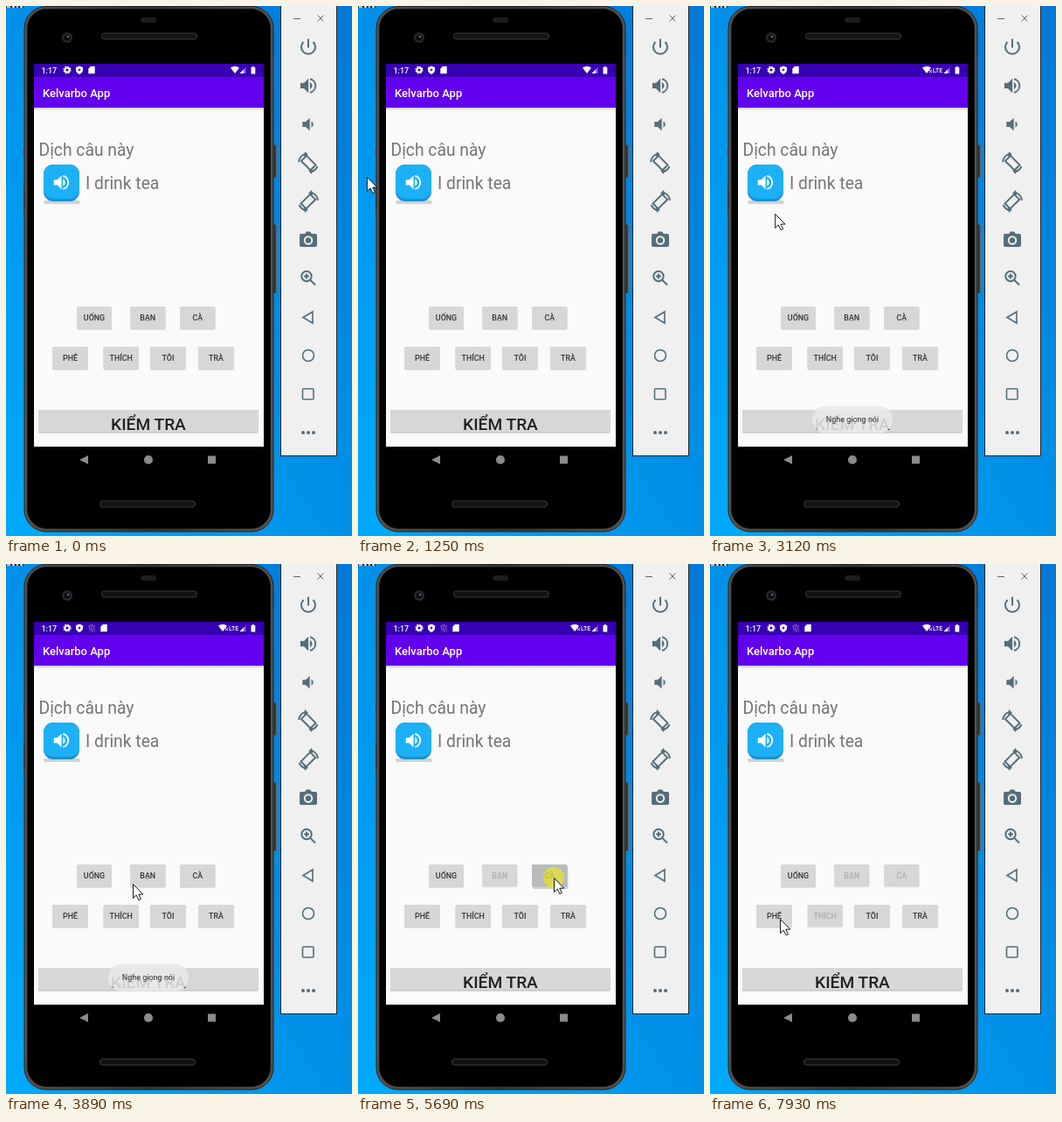
These frames come from a looping animation (396 px wide and 605 px high, 7990 ms). An HTML page:

```html
<!DOCTYPE html>
<html lang="vi">
<head>
<meta charset="utf-8">
<title>Emulator</title>
<style>
  html, body { margin: 0; width: 100%; height: 100%; overflow: hidden; background: #0090e6; }
  svg { display: block; width: 100vw; height: 100vh; }
  text { font-family: Roboto, "Noto Sans", sans-serif; }
  .word { font-size: 8.9px; font-weight: 500; text-anchor: middle; fill: #333; }
  .prompt { font-size: 19.3px; fill: #757575; }
  .line { fill: none; stroke: #546e7a; stroke-width: 2; }
  .solid { fill: #546e7a; }
</style>
</head>
<body>
<svg viewBox="0 0 396 605" xmlns="http://www.w3.org/2000/svg">
  <defs>
    <linearGradient id="sky" x1="0" y1="1" x2="1" y2="0">
      <stop offset="0" stop-color="#00aafa"/><stop offset="1" stop-color="#0078d7"/>
    </linearGradient>
    <linearGradient id="edge">
      <stop offset="0" stop-color="#55504e"/><stop offset=".5" stop-color="#353332"/><stop offset="1" stop-color="#55504e"/>
    </linearGradient>
    <linearGradient id="barShadow" x1="0" y1="0" x2="0" y2="1">
      <stop offset="0" stop-color="#000" stop-opacity=".22"/><stop offset="1" stop-color="#000" stop-opacity="0"/>
    </linearGradient>
    <path id="speaker" d="M3 9v6h4l5 5V4L7 9zM14 8a4.5 4.5 0 0 1 0 8z"/>
    <path id="wave" d="M14 4.2a8 8 0 0 1 0 15.6" fill="none" stroke-width="2"/>
    <g id="turn">
      <path class="line" d="M7.5 5.5 13.5 -.5 24 10 18 16z" transform="translate(-3.6 4.4)"/>
      <path class="line" d="M1 11A11 11 0 0 1 10 1.5M14 22.5A11 11 0 0 0 22.5 16" stroke-width="1.6"/>
      <path class="solid" d="M8-1l4 4-5 2zM16 25l-4-4 5-2z"/>
    </g>
  </defs>

  <rect width="396" height="605" fill="url(#sky)"/>
  <path d="M0 0h20v2H0z" fill="#10263a"/>
  <path d="M1 1h4M7 1h3M12 1h2M16 1h3" stroke="#fff" stroke-width="1.6"/>

  <!-- Phone body -->
  <g fill="#35383c" stroke="#777" stroke-width=".7">
    <rect x="304" y="158" width="5.5" height="38" rx="1.5"/>
    <rect x="304" y="249" width="5.5" height="79" rx="1.5"/>
    <path d="M22 163h-2v7h2M22 205h-2v32h2"/>
  </g>
  <rect x="21" y=".5" width="285" height="599.5" rx="25" fill="url(#edge)" stroke="#252424"/>
  <rect x="24.5" y="3.5" width="278" height="593" rx="22" stroke="#171717"/>
  <rect x="154" y="13" width="18" height="6" rx="3" fill="#1d1d20"/>
  <circle cx="70" cy="36" r="6" fill="#26282b"/>
  <circle cx="70" cy="36" r="3.5" fill="#08090c"/>
  <circle cx="71" cy="35" r="1.5" fill="#565d66"/>
  <g fill="#131313" stroke="#3a3a3a">
    <rect x="109.500" y="31" width="109" height="7" rx="3.500"/>
    <rect x="107.500" y="565" width="109" height="7" rx="3.500"/>
  </g>

  <!-- App -->
  <rect x="32" y="66" width="263" height="437" fill="#fafafa"/>
  <rect x="32" y="66" width="263" height="15" fill="#3700b3"/>
  <rect x="32" y="81" width="263" height="35" fill="#6200ee"/>
  <rect x="32" y="116" width="263" height="3" fill="url(#barShadow)"/>
  <g fill="#fff">
    <text x="40.500" y="76.500" font-size="9" font-weight="500">1:17</text>
    <circle cx="70" cy="73" r="2.600" fill="none" stroke="#fff" stroke-width="2"/>
    <circle cx="70" cy="73" r="4" fill="none" stroke="#fff" stroke-width="1.200" stroke-dasharray="1.600 1.540"/>
    <path d="M84 68.500l4 1.500v3q0 3-4 5-4-2-4-5v-3z"/>
    <circle cx="84" cy="73" r="1.300" fill="#3700b3"/>
    <g id="print" fill="none" stroke="#8e6cd0" stroke-width=".9">
      <path d="M94 72q4-5 8 0M95 75q0-4 3-4t3.500 6M97 77q-.500-4 1-4t1 5"/>
    </g>
    <path id="card" d="M97 69h4.500v8h-7v-5.500zM97 70.500v1.500M99 70.500v1.500" stroke="#fff" stroke-width=".4"/>
    <path id="wifi" d="M257 70.500q5-3.500 10 0l-5 6.500z"/>
    <g id="lte">
      <path d="M251 73l3 3m0-3l-3 3" stroke="#fff"/>
      <text x="255" y="76" font-size="7" font-weight="500">LTE</text>
    </g>
    <path d="M267.500 77l7-7v7z" opacity=".4"/>
    <path d="M267.500 77l4.500-4.500V77z"/>
    <path d="M280.500 70h1.300v-1h2.200v1h1.300v7.500h-4.800z"/>
    <text x="42" y="104" font-size="13" font-weight="500">Kelvarbo App</text>
  </g>
  <text class="prompt" x="37.500" y="171">Dịch câu này</text>
  <text class="prompt" x="91" y="209">I drink tea</text>

  <rect id="soundBase" x="43.500" y="222" width="41" height="4" fill="#d0d1d1"/>
  <rect x="43" y="181" width="41" height="42" rx="11" fill="#1792d0"/>
  <rect x="43" y="181" width="41" height="39" rx="11" fill="#1cb0f6"/>
  <g transform="translate(52 190)" fill="#fff" stroke="#fff" stroke-width=".2">
    <use href="#speaker" transform="scale(.95)"/><use href="#wave" transform="scale(.95)"/>
  </g>

  <g id="words"></g>

  <rect x="37" y="461" width="251.500" height="26.500" rx="1" fill="#b9baba"/>
  <rect x="37" y="461" width="251.500" height="25.500" rx="1" fill="#d6d7d7"/>
  <text x="163" y="484" font-size="19.200" font-weight="500" text-anchor="middle" fill="#222">KIỂM TRA</text>
  <g id="toast">
    <rect x="117" y="456.500" width="92" height="31" rx="15.500" fill="#ebebeb" opacity=".86"/>
    <text x="163" y="475" font-size="9" text-anchor="middle" fill="#333">Nghe giọng nói</text>
  </g>

  <rect x="32" y="503" width="263" height="30"/>
  <g fill="#8b8b8b">
    <path d="M84 518l10-5v10z"/><circle cx="163" cy="518" r="5"/><path d="M231 513.500h9v9h-9z"/>
  </g>

  <!-- Emulator toolbar -->
  <rect x="314.500" y="-1" width="64" height="514.500" fill="#f0f0f0" stroke="#222"/>
  <path d="M329 14.500h8M356.500 10.500l7 7m0-7l-7 7" stroke="#666" fill="none"/>
  <path class="line" d="M346 37.500v10M340.500 41a8 8 0 1 0 11 0"/>
  <g class="solid" transform="translate(334 79)" stroke="#546e7a" stroke-width=".2">
    <use href="#speaker"/><use href="#wave"/>
  </g>
  <use class="solid" href="#speaker" transform="translate(336.500 124) scale(.93)"/>
  <use href="#turn" transform="translate(334 167)"/>
  <use href="#turn" transform="translate(358 211) scale(-1 1)"/>
  <path class="solid" d="M338 260h4l2-2.500h4l2 2.500h4q2 0 2 2v11q0 2-2 2h-16q-2 0-2-2v-11q0-2 2-2z"/>
  <circle cx="346" cy="267.500" r="4.200" fill="#546e7a" stroke="#f0f0f0" stroke-width="2"/>
  <circle class="line" cx="344" cy="308.500" r="5.700"/>
  <path class="line" d="M348.500 313l5.500 5.500"/>
  <path class="line" d="M341 308.500h6m-3-3v6" stroke-width="1.200"/>
  <path class="line" d="M340 355.500l11-6.500v13z" style="stroke-width:1.600"/>
  <circle class="line" cx="346" cy="399" r="6.500" style="stroke-width:1.600"/>
  <rect class="line" x="339.500" y="437" width="12.500" height="12" rx="1" style="stroke-width:1.600"/>
  <g class="solid"><circle cx="340" cy="487" r="2"/><circle cx="346" cy="487" r="2"/><circle cx="352" cy="487" r="2"/></g>

  <circle id="tap" r="12" fill="#e2df3c" opacity=".82"/>
  <path id="cursor" d="M.5 .5v16l3.700-3.500 2.700 5.700 2.500-1.200-2.600-5.400h5z" fill="#fff" stroke="#000" stroke-width=".9"/>
</svg>

<script>
const LOOP = 7990;
const $ = id => document.getElementById(id);
const clamp = v => Math.max(0, Math.min(1, v));
const ramp = (t, from, to) => clamp((t - from) / (to - from));

// label, x, y, width, time of the tap
const words = [
  ['UỐNG', 81, 343, 40], ['BẠN', 142, 343, 40.5, 4310], ['CÀ', 199, 343, 40.5, 5540],
  ['PHÊ', 53, 389, 41], ['THÍCH', 111.5, 389, 40.5, 7020], ['TÔI', 165, 389, 41], ['TRÀ', 220, 389, 41]
].map(([label, x, y, w, tap]) => {
  $('words').insertAdjacentHTML('beforeend', `<g>
    <rect x="${x}" y="${y + 1}" width="${w}" height="25.5" rx="1.5" fill="#000" opacity=".17"/>
    <rect x="${x}" y="${y}" width="${w}" height="25.5" rx="1.5"/>
    <text class="word" x="${x + w / 2}" y="${y + 16}">${label}</text></g>`);
  const [shadow, face, text] = $('words').lastElementChild.children;
  return { shadow, face, text, tap: tap ?? Infinity };
});

// start, end, steps, first position, last position
const moves = [
  [0, 0, 1, -50, 0, -50, 0],
  [380, 700, 5, 380, 592, 236, 456],
  [930, 1000, 2, 134, 355, 32, 255],
  [1080, 1080, 1, -50, 220, -50, 220],
  [1250, 1550, 5, 10, 195, 64, 199],
  [2960, 3740, 11, 65, 204, 111, 369],
  [3820, 3970, 3, 134, 372, 156, 358],
  [5060, 5220, 3, 179, 358, 224, 358],
  [6000, 6300, 5, 212, 366, 163, 396],
  [6380, 6540, 3, 148, 401, 117, 410],
  [6690, 6840, 3, 120, 409, 126, 406],
  [7700, 7930, 4, 115, 406, 80, 405]
];

function cursorAt(t) {
  const [start, end, steps, x0, y0, x1, y1] = moves.findLast(m => m[0] <= t);
  const last = steps - 1;
  const step = last ? Math.min(last, Math.floor((t - start + 6) / (end - start) * last)) : 0;
  const p = last ? step / last : 1;
  return [x0 + (x1 - x0) * p, y0 + (y1 - y0) * p];
}

function drawWord({ shadow, face, text, tap }, t) {
  const age = t - tap;
  const ripple = age < 0 ? 0 : ramp(age, -60, 120) * (1 - ramp(age, 220, 450));
  const grey = 214 - 29 * ripple;
  const disabled = age >= 230;
  face.setAttribute('fill', `rgb(${grey},${grey + 1},${grey + 1})`);
  shadow.setAttribute('transform', `translate(${ripple} ${ripple * 1.5})`);
  shadow.setAttribute('opacity', disabled ? 0.04 : 0.17);
  text.style.fill = disabled ? '#aaabab' : '#333';
}

function draw(t) {
  const [x, y] = cursorAt(t);
  $('cursor').setAttribute('transform', `translate(${x} ${y})`);
  $('tap').setAttribute('transform', `translate(${x} ${y})`);
  const taps = [1860, ...words.map(w => w.tap)];
  $('tap').style.display = taps.some(p => t >= p && t < p + 220) ? '' : 'none';
  $('soundBase').setAttribute('fill', t >= 1860 && t < 2160 ? '#b9baba' : '#d0d1d1');
  words.forEach(w => drawWord(w, t));

  const lte = t >= 2010, print = t >= 3200;
  $('lte').style.display = lte ? '' : 'none';
  $('wifi').setAttribute('transform', `translate(${lte ? -14 : 0} 0)`);
  $('print').style.display = print ? '' : 'none';
  $('card').setAttribute('transform', `translate(${print ? 14 : 0} 0)`);
  $('toast').setAttribute('opacity', ramp(t, 2400, 2800) * (1 - ramp(t, 4300, 4590)));
}

function frame() {
  draw(performance.now() % LOOP);
  requestAnimationFrame(frame);
}
frame();
</script>
</body>
</html>
```
